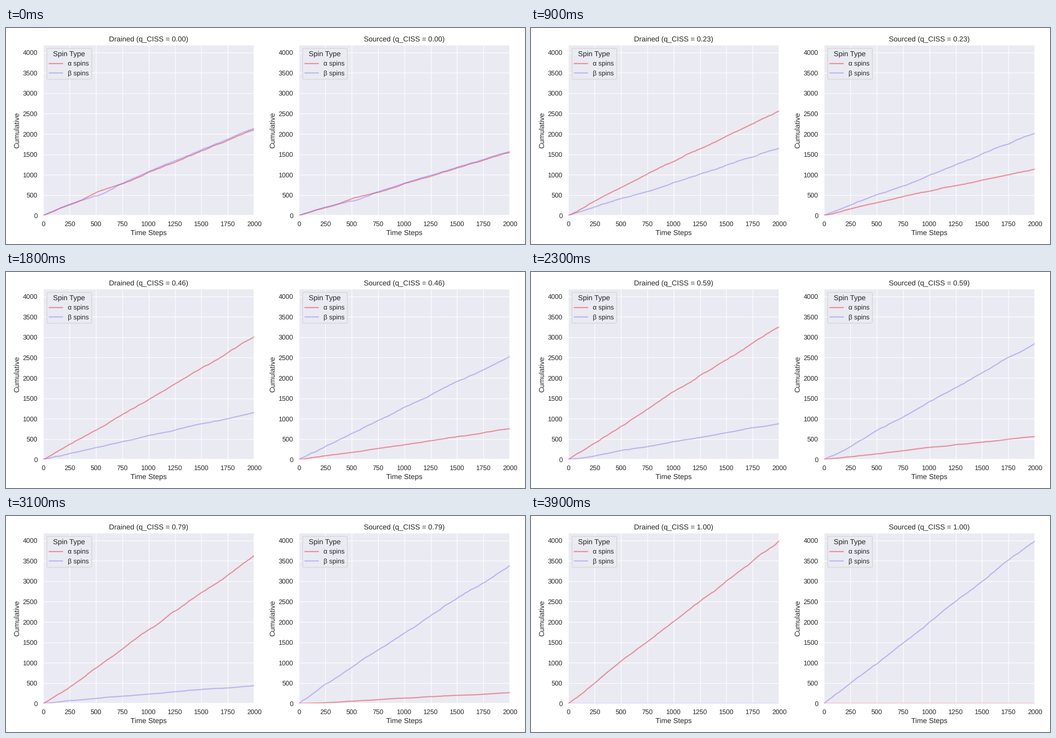
A matplotlib script for the animation above (4 s loop, 1159 by 483 pixels).

```python
import numpy as np
import matplotlib.pyplot as plt
from matplotlib.animation import FuncAnimation

W, H, DPI = 1159, 483, 96.58
TOP, BOTTOM = 37.6, 419.3
FRAMES = 40
STEPS = 2000
INK = "0.15"
PANEL = "#eaeaf2"
RED, BLUE = "#e60f20", "mediumslateblue"

plt.rcParams.update({
    "font.family": "Liberation Sans", "font.size": 12, "text.hinting": "none",
    "axes.titlesize": 12, "axes.labelsize": 12,
    "xtick.labelsize": 11, "ytick.labelsize": 11,
    "legend.fontsize": 11, "legend.title_fontsize": 12,
    "text.color": INK, "axes.labelcolor": INK,
    "xtick.color": INK, "ytick.color": INK,
    "axes.facecolor": PANEL, "axes.edgecolor": "white",
    "axes.linewidth": 1.25, "axes.axisbelow": True,
    "axes.grid": True, "grid.color": "white", "grid.linewidth": 1,
    "xtick.bottom": False, "ytick.left": False,
    "xtick.major.size": 6, "ytick.major.size": 6,
    "lines.solid_capstyle": "round",
})

t = np.linspace(0, STEPS, 101)


def final_counts(q):
    """Final counts: drained alpha, drained beta, sourced alpha, sourced beta."""
    bow = q * (1 - q)
    return (2100 + 1890 * q + 150 * bow,
            2140 * (1 - q),
            1545 * (1 - q) - 300 * bow,
            1570 + 2415 * q - 640 * bow)


def walk(i, spin, final):
    """Noisy count up to its final value; both panels share a spin's noise."""
    rng = np.random.default_rng(2 * i + spin)
    noise = np.append(0, np.cumsum(rng.normal(size=len(t) - 1)))
    noise -= noise[-1] * t / STEPS
    # Weak selectivity lets alpha run ahead of beta for a while.
    weak = (1 - i / (FRAMES - 1)) ** 20
    lead = (55 - 120 * spin) * weak * np.exp(-((t - 560) / 210) ** 2)
    curve = final * (t + lead) / STEPS + 0.1 * np.sqrt(final) * noise
    return np.maximum.accumulate(np.clip(curve, 0, final))


def panel(left):
    ax = fig.add_axes([left / W, 1 - BOTTOM / H, 471 / W, (BOTTOM - TOP) / H])
    ax.set(xlim=(0, STEPS), ylim=(0, 4186), xlabel="Time Steps", ylabel="Cumulative",
           xticks=range(0, 2001, 250), yticks=range(0, 4001, 500))
    pair = [ax.plot([], [], color=c, alpha=0.4, lw=2, zorder=3, label=f"{s} spins")[0]
            for c, s in ((RED, "α"), (BLUE, "β"))]
    ax.legend(title="Spin Type", loc="upper left")
    return ax, pair


fig = plt.figure(figsize=(W / DPI, H / DPI), dpi=DPI, facecolor="white")
drained, drained_lines = panel(83.2)
sourced, sourced_lines = panel(654.2)


def update(i):
    q = i / (FRAMES - 1)
    lines = drained_lines + sourced_lines
    for k, (line, final) in enumerate(zip(lines, final_counts(q))):
        line.set_data(t, walk(i, k % 2, final))
    drained.set_title(f"Drained (q_CISS = {q:.2f})")
    sourced.set_title(f"Sourced (q_CISS = {q:.2f})")
    return lines


anim = FuncAnimation(fig, update, frames=FRAMES, interval=100, repeat=True,
                     repeat_delay=0, blit=False)
plt.show()
```
